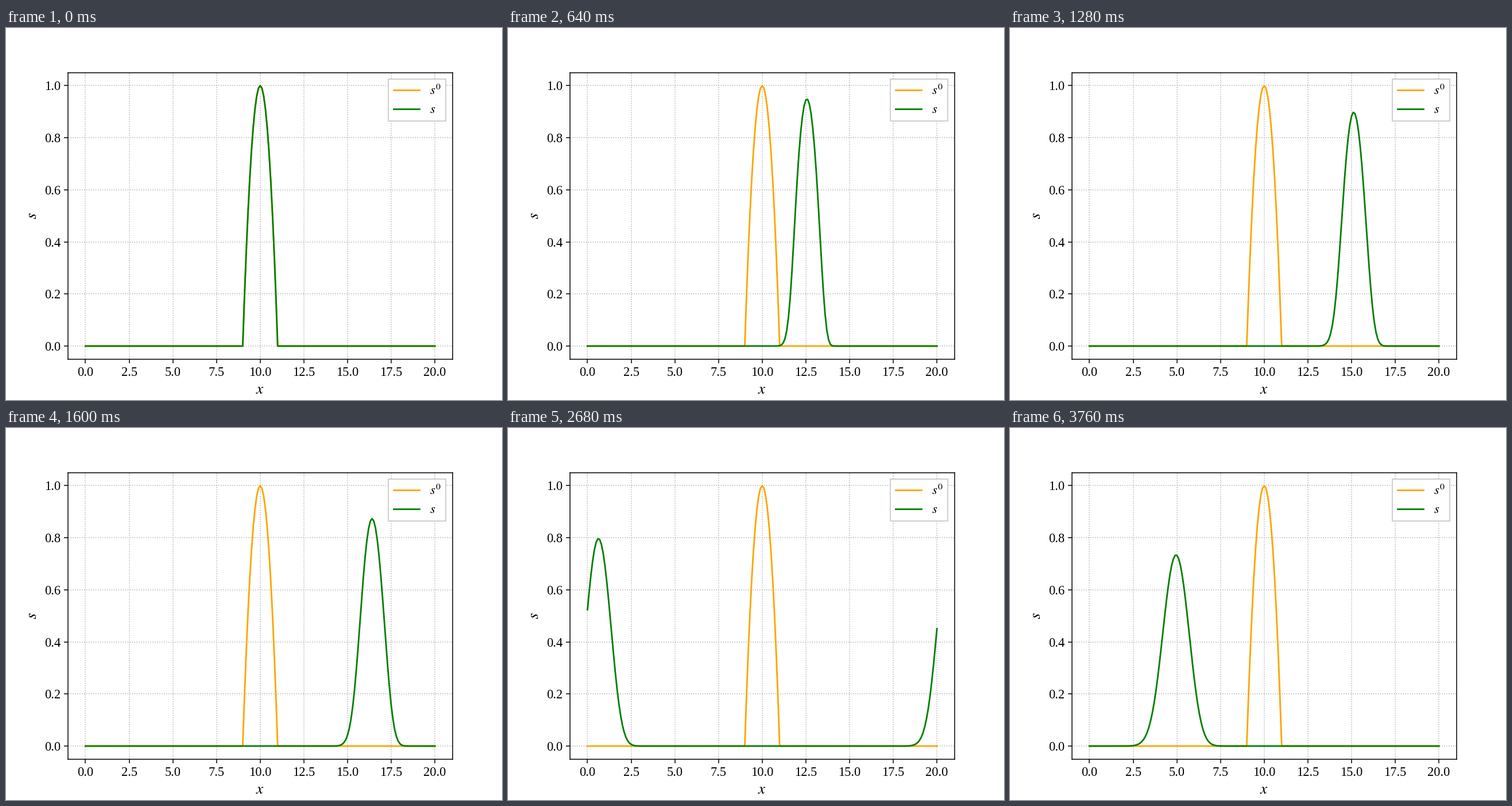
A matplotlib script that plays this animation: 864x648 px, repeating every 3800 ms.

```python
import numpy as np
import matplotlib.pyplot as plt
from matplotlib.animation import FuncAnimation

plt.rcParams.update({
    "font.family": "Liberation Serif",
    "font.size": 12,
    "axes.labelsize": 14.4,
    "mathtext.fontset": "stix",
    "legend.fancybox": False,
    "legend.framealpha": 1.0,
})

FRAMES = 95
INTERVAL = 40        # ms
COURANT = 0.8
STEPS_PER_FRAME = 2

x = np.linspace(0, 20, 201)
s0 = np.maximum(1 - (x - 10) ** 2, 0)


def advect(s):
    """One first-order upwind step on a periodic grid."""
    return s - COURANT * (s - np.roll(s, 1))


def solve():
    states = [s0]
    for _ in range(FRAMES - 1):
        s = states[-1]
        for _ in range(STEPS_PER_FRAME):
            s = advect(s)
        states.append(s)
    return states


states = solve()

fig, ax = plt.subplots(figsize=(6.4, 4.8), dpi=135)
ax.plot(x, s0, color="orange", label="$s^0$")
wave, = ax.plot(x, s0, color="green", label="$s$")
ax.set_xlim(-1, 21)
ax.set_ylim(-0.05, 1.05)
ax.set_xlabel("$x$")
ax.set_ylabel("$s$")
ax.grid(linestyle=":")
ax.legend(loc="upper right")


def update(i):
    wave.set_ydata(states[i])
    return wave,


anim = FuncAnimation(fig, update, frames=FRAMES, interval=INTERVAL,
                     repeat=True, repeat_delay=0)
plt.show()
```
